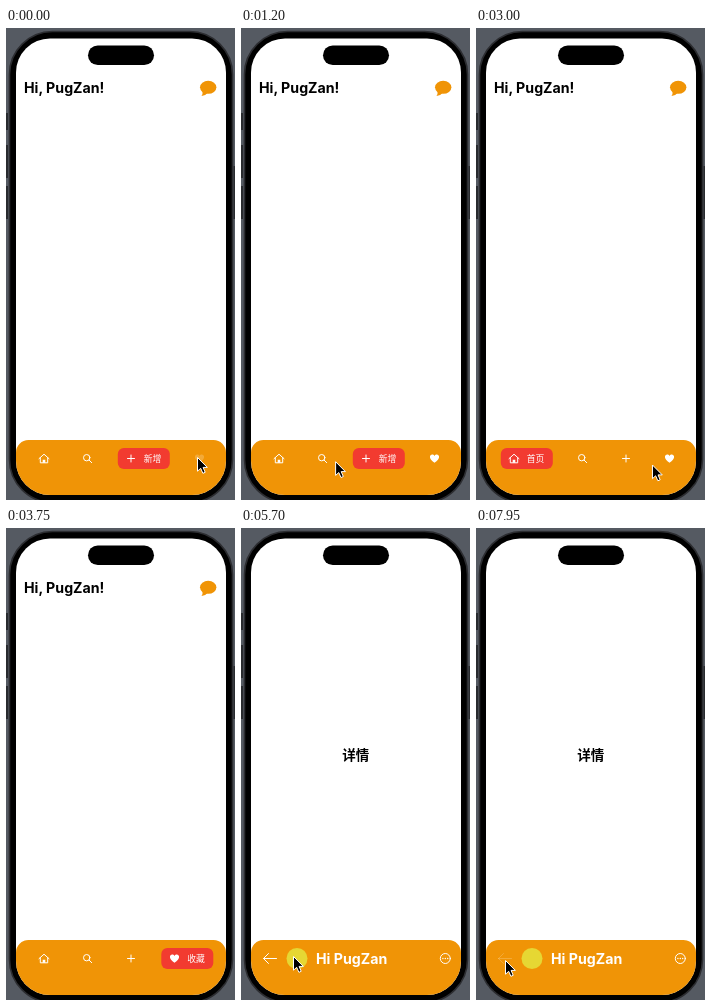
An HTML page that plays this animation: 229x472 px, repeating every 8 s.

```html
<!DOCTYPE html>
<html lang="zh-CN">
<head>
<meta charset="utf-8">
<style>
html, body { margin: 0; width: 100%; height: 100%; overflow: hidden; background: #555a62; }
svg { display: block; width: 229px; height: 472px; }
.title { font: 700 14.2px Inter, sans-serif; }
.zh { font-family: "Noto Sans CJK SC", "Noto Sans CJK", sans-serif; }
.line { fill: none; stroke: #fff; stroke-linecap: round; stroke-linejoin: round; }
</style>
</head>
<body>
<svg viewBox="0 0 229 472">
  <!-- phone body -->
  <path d="M1 85v17M1 117v33M1 158v33M228.500 138v53" stroke="#292b2f" stroke-width="2"/>
  <rect x="3.500" y="3.500" width="223" height="471" rx="43" stroke="#2c2d31" stroke-width="1.600"/>
  <clipPath id="screen"><rect x="10" y="10.500" width="210" height="456.500" rx="34"/></clipPath>
  <g clip-path="url(#screen)">
    <rect width="229" height="472" fill="#fff"/>
    <rect x="10" y="412" width="210" height="80" rx="12.500" fill="#f09406"/>

    <g id="home">
      <text id="hello" class="title" x="18" y="65">Hi, PugZan!</text>
      <g id="chat" fill="#f09406">
        <ellipse cx="202.200" cy="59.300" rx="8.200" ry="6.500"/>
        <path d="M196.500 63q.5 2.500-1 5q4-.2 6-3z"/>
      </g>
      <rect id="pill" y="420" width="52" height="21" rx="6" fill="#f23b30"/>
      <g id="tabs">
        <g><path class="line" d="M-5 .2L0-4.300L5 .2M-3.700-.7V4.300H3.700V-.7"/><path d="M-1.300 4.300V1.200H1.300V4.300z" fill="#fff"/></g>
        <g><circle class="line" cx="-.8" cy="-.8" r="3.200"/><path class="line" d="M1.600 1.600L4.200 4.200"/></g>
        <g><path class="line" d="M-3.500 0H3.500M0-3.500V3.500"/></g>
        <g><path fill="#fff" d="M0 4.200C-3 2-4.600.3-4.600-1.500C-4.600-4.200-1.300-4.900 0-2.500C1.300-4.900 4.600-4.200 4.600-1.500C4.600.3 3 2 0 4.200z"/></g>
      </g>
      <g id="labels" class="zh" font-size="8.800" fill="#fff">
        <text y="433.800">首页</text><text y="433.800">查询</text><text y="433.800">新增</text><text y="433.800">收藏</text>
      </g>
    </g>

    <g id="detail">
      <text class="zh" x="114.700" y="232.400" font-size="13.500" font-weight="700" text-anchor="middle">详情</text>
      <path id="back" class="line" d="M35.500 430.500H22.500M27.500 425.500L22.500 430.500L27.500 435.500"/>
      <circle cx="56" cy="430.500" r="10.500" fill="#e6d733"/>
      <text class="title" x="75" y="435.500" fill="#fff">Hi PugZan</text>
      <g id="more" class="line">
        <circle cx="204.300" cy="430.500" r="5"/>
        <path d="M201.900 430.500h0M204.300 430.500h0M206.700 430.500h0" stroke-width="1.400"/>
      </g>
    </g>
  </g>
  <rect x="82" y="17.500" width="66" height="19.500" rx="9.750"/>
  <path id="cursor" d="M.5.500V14.200L3.700 11.300L5.900 16.300L8.200 15.300L6.100 10.400H10.300z" stroke="#fff"/>
</svg>
<script>
const $ = id => document.getElementById(id);
const LOOP = 8000, STEP = 150, HOLD = 140;
const icons = [...$('tabs').children], labels = [...$('labels').children];
const [homeTab, findTab, addTab, likeTab] = icons;

// pointer stops: time, x, y and what is pressed there
const stops = [
  [0, 191, 429, likeTab],
  [450, 128, 431, addTab],
  [1400, 88, 431, findTab],
  [2300, 42, 432, homeTab],
  [3120, 188, 432, likeTab],
  [4350, 206, 62, $('chat')],
  [5110, 204, 64],
  [5700, 52, 428],
  [6000, 29, 440],
  [6450, 207, 431, $('more')],
  [7050, 82, 443],
  [7350, 36, 444],
  [7900, 29, 432, $('back')]
];
const taps = stops.filter(s => s[3]);
const tabTaps = taps.filter(s => icons.includes(s[3]));

const ease = v => (v = Math.min(1, Math.max(0, v)), v * v * (3 - 2 * v));
const mix = (a, b, p) => a + (b - a) * p;
const centre = (i, sel) => 38 + 43.5 * i + (i > sel ? 25 : 0);
const set = (el, name, value) => el.setAttribute(name, value);

function drawTabs(t) {
  const done = tabTaps.filter(s => s[0] + HOLD <= t);
  const order = [2, 2, ...done.map(s => icons.indexOf(s[3]))];
  const [old, sel] = order.slice(-2);
  const p = done.length ? ease((t - done.at(-1)[0] - HOLD) / 350) : 1;
  set($('pill'), 'x', mix(centre(old, old), centre(sel, sel), p) - 13.2);
  icons.forEach((icon, i) => {
    const x = mix(centre(i, old), centre(i, sel), p);
    set(icon, 'transform', `translate(${x} 430.5)`);
    set(labels[i], 'x', x + 12.7);
    set(labels[i], 'opacity', i === sel ? p : i === old ? ease(1 - 2 * p) : 0);
  });
}

// the pointer rests while pressing, then glides on with a slight sag
function drawCursor(t) {
  const k = stops.findLastIndex(s => s[0] <= t);
  const [start, x, y, target] = stops[k];
  const [end, nextX, nextY] = stops[k + 1] || [LOOP, x, y];
  const leave = start + (target ? HOLD : 0);
  const p = ease((t - leave) / (end - leave));
  const sag = 0.12 * Math.abs(nextX - x) * Math.sin(Math.PI * p);
  set($('cursor'), 'transform', `translate(${mix(x, nextX, p)} ${mix(y, nextY, p) + sag})`);
  set($('cursor'), 'opacity', t > 3450 && t < 3900 ? 0 : 1);
}

function draw(now) {
  const t = Math.floor(now % LOOP / STEP) * STEP;
  const page = ease((t - 4450) / 400);
  set($('home'), 'opacity', 1 - page);
  set($('hello'), 'x', 18 - 5 * page);
  set($('detail'), 'opacity', page);
  drawTabs(t);
  for (const [, , , el] of taps) {
    const pressed = taps.some(s => s[3] === el && t >= s[0] && t < s[0] + HOLD);
    set(el, 'opacity', pressed ? 0.2 : 1);
  }
  drawCursor(t);
}

const begin = performance.now();
function tick() {
  draw(performance.now() - begin);
  requestAnimationFrame(tick);
}
tick();
</script>
</body>
</html>
```
